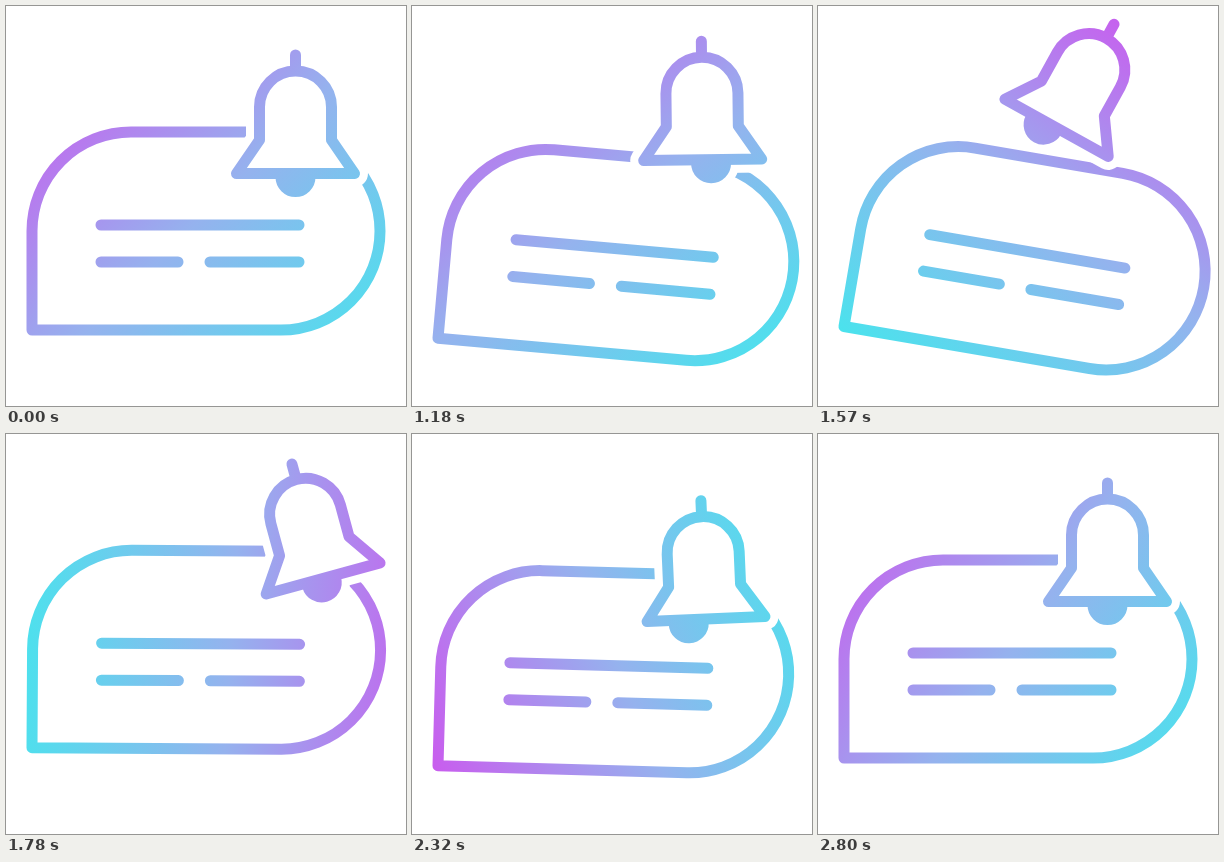
An HTML page for the animation above (2830 ms loop, 400 by 400 pixels).

```html
<!DOCTYPE html>
<html lang="en">
<head>
<meta charset="utf-8">
<title>Notification bell</title>
<style>
  html, body { margin: 0; width: 100%; height: 100%; overflow: hidden; background: #fff; }
  svg { display: block; width: 100vw; height: 100vh; }
  mask { stroke-linecap: round; stroke-linejoin: round; }
  .ink { color: #fff; stroke: #fff; stroke-width: 11; }
  .halo { color: #000; stroke: #000; stroke-width: 27; }
</style>
</head>
<body>
<svg viewBox="0 0 400 400">
  <defs>
    <linearGradient id="paint" gradientUnits="userSpaceOnUse" x1="-14" y1="212" x2="412" y2="212">
      <stop offset="0" stop-color="#c95cee"/>
      <stop offset=".5" stop-color="#95b2ee"/>
      <stop offset="1" stop-color="#4be2ed"/>
    </linearGradient>
    <g id="bellShape">
      <circle id="clapper" cx="289.5" cy="171" r="14.5" fill="currentColor"/>
      <path d="M289.5 49V60" fill="none"/>
      <path d="M230.5 167.5L253.5 134V101A36 36 0 0 1 325.5 101V134L348.5 167.5Z" fill="#000"/>
    </g>
    <mask id="art" maskUnits="userSpaceOnUse" x="0" y="0" width="400" height="400">
      <g id="bubble" class="ink" fill="none">
        <path d="M26 324V225A99 99 0 0 1 125 126H275A99 99 0 0 1 275 324Z"/>
        <path d="M95 219H293M95 256H172M204 256H293"/>
      </g>
      <g id="bell">
        <use href="#bellShape" class="halo"/>
        <use href="#bellShape" class="ink"/>
      </g>
    </mask>
  </defs>
  <rect width="400" height="400" fill="url(#paint)" mask="url(#art)"/>
</svg>
<script>
const LOOP = 2830, REST = 1030, STEP = 30, START = 1000, MOVE = 1800;

const ease = u => (1 - Math.cos(Math.PI * u)) / 2;

// Eases through turning points [ms after START, value], from zero and back to it.
function sway(points, t) {
  const keys = [[0, 0], ...points, [MOVE, 0]];
  const i = keys.findIndex(k => k[0] >= t);
  if (i < 1) return 0;
  const [t0, v0] = keys[i - 1], [t1, v1] = keys[i];
  return v0 + (v1 - v0) * ease((t - t0) / (t1 - t0));
}

const tilt = [[360, 10.2], [520, 10.2], [960, -5.2], [1320, 1.6]];
const drop = [[340, 15], [700, -11], [1330, 7.8]];
const lift = [[400, -32.5], [570, -32.5], [1200, 20], [1740, 0]];
const clap = [[90, 14], [410, -17], [900, 0], [1320, -17.5]];
const swing = [12, -29, 29, -17, 6, -2.5].map((angle, i) => [90 + 240 * i, angle]);

const el = id => document.getElementById(id);
const paint = el('paint'), bubble = el('bubble'), bell = el('bell'), clapper = el('clapper');

function draw() {
  const now = performance.now() % LOOP;
  const t = now < REST ? 0 : REST - START + Math.floor((now - REST) / STEP) * STEP;
  paint.setAttribute('gradientTransform', `rotate(${45 + 350 * ease(t / MOVE)} 212 212)`);
  bubble.setAttribute('transform', `translate(0 ${sway(drop, t)}) rotate(${sway(tilt, t)} 26 324)`);
  bell.setAttribute('transform', `translate(0 ${sway(lift, t)}) rotate(${sway(swing, t)} 289.5 62.5)`);
  clapper.setAttribute('transform', `translate(${sway(clap, t)} 0)`);
  requestAnimationFrame(draw);
}
draw();
</script>
</body>
</html>
```
